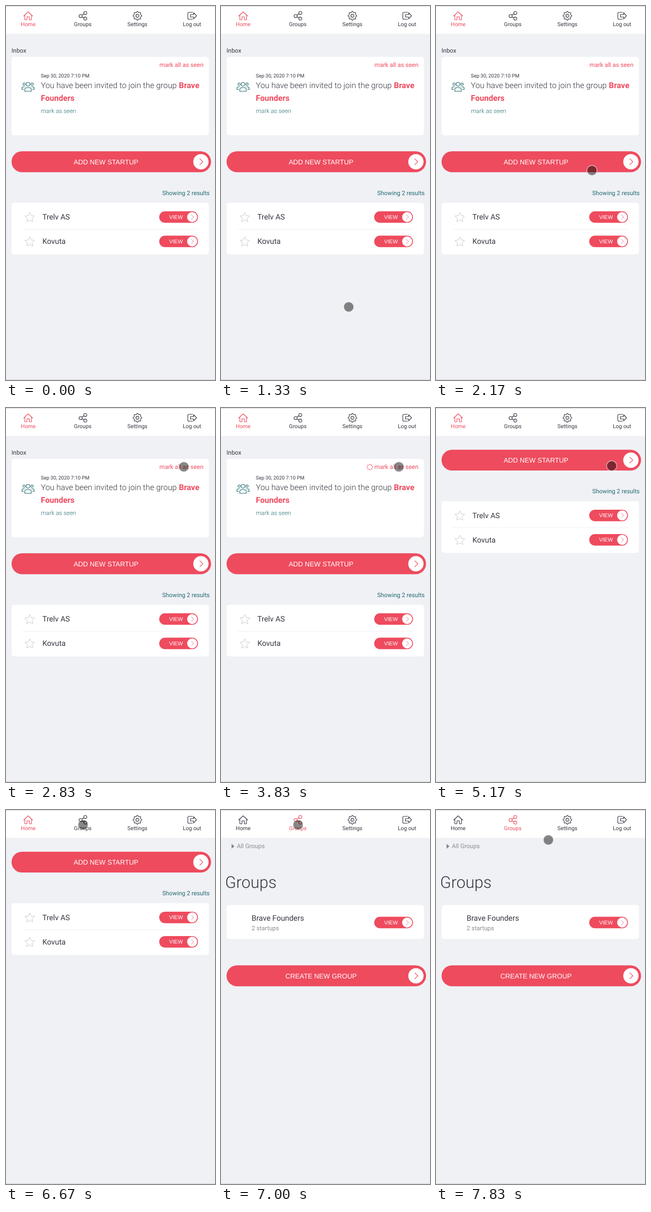
Write an HTML page that moves like this. It is 396 by 706 pixels and loops after 8000 ms.

```html
<!DOCTYPE html>
<html lang="en">
<head>
<meta charset="utf-8">
<title>Startup inbox</title>
<style>
  html, body { margin: 0; height: 100%; overflow: hidden; background: #f0f1f5; }
  svg { display: block; width: 396px; height: 706px; font-family: Roboto, sans-serif; }
  text { fill: currentColor; text-rendering: geometricPrecision; }
  .mid { text-anchor: middle; }
  .end { text-anchor: end; }
  .caps { font-family: "Liberation Sans", Arial, sans-serif; fill: #fff; text-anchor: middle; }
  .icon { fill: none; stroke: currentColor; stroke-width: 1.1; stroke-linejoin: round; stroke-linecap: round; }
  .red { color: #ee4b5e; }
  .teal { color: #236b72; }
  .grey { color: #8b8b92; }
  .dark { color: #363642; }
</style>
</head>
<body>
<svg id="stage" viewBox="0 0 396 706"></svg>
<script>
const text = (x, y, size, str, cls = 'dark', weight = 400) =>
  `<text x="${x}" y="${y}" font-size="${size}" class="${cls}" font-weight="${weight}">${str}</text>`;
const icon = (d, cls = '') => `<path class="icon ${cls}" d="${d}"/>`;
const ring = (x, y, r) => `M${x - r} ${y}a${r} ${r} 0 1 0 ${2 * r} 0a${r} ${r} 0 1 0 ${-2 * r} 0`;
const card = (y, h) => `<rect x="10.5" y="${y}" width="374" height="${h}" rx="5" fill="#fff"/>`;

// Closed outline whose radius depends on the point index
const polar = (cx, cy, n, radius, turn = 0) => 'M' + Array.from({ length: n }, (_, i) => {
  const a = i / n * 2 * Math.PI - Math.PI / 2 + turn;
  return (cx + radius(i) * Math.cos(a)).toFixed(2) + ' ' + (cy + radius(i) * Math.sin(a)).toFixed(2);
}).join('L') + 'Z';

const pill = (x, y, w, h, label, size, labelX, knobX, knobR, tip) => `
  <rect x="${x}" y="${y - h / 2}" width="${w}" height="${h}" rx="${h / 2}" fill="#ee4b5e"/>
  ${text(labelX, y + size * 0.36, size, label, 'caps')}
  <circle cx="${knobX}" cy="${y}" r="${knobR}" fill="#fff"/>
  <path class="icon red" stroke-width="1" d="M${knobX - tip / 2 + 0.8} ${y - tip}l${tip} ${tip}l${-tip} ${tip}"
    style="stroke-width:${tip / 5}"/>`;
const wideButton = (y, label) => pill(10.5, y, 378, 39.4, label, 12.8, 189.5, 369.3, 14.5, 5.6);
const viewButton = y => pill(290.3, y, 73.4, 21.8, 'VIEW', 10.24, 322, 352.7, 9.5, 4);

const row = (y, name) => `
  <path d="${polar(45, y + 1, 10, i => i % 2 ? 4.6 : 9.7)}" fill="none" stroke="#cdcdd3" stroke-linejoin="round"/>
  ${text(69, y + 4.8, 14.3, name)}${viewButton(y)}`;

const navItems = [
  ['Home', 42, 'M33.5 19L42 11L50.5 19M35.7 17.2V26H39.7V20.5H44.3V26H48.3V17.2'],
  ['Groups', 145.5, ring(141.4, 19, 3) + ring(150.3, 13.2, 2.9) + ring(150.3, 23.8, 2.9) +
    'M143.9 17.3L147.8 14.8M144 20.5L147.7 22.5'],
  ['Settings', 249, ring(249, 18.5, 2.9) +
    polar(249, 18.5, 32, i => (i + 1) % 4 < 2 ? 8.2 : 6.5, Math.PI / 32)],
  ['Log out', 352.5, 'M353.5 12H346.5Q344.5 12 344.5 14V23Q344.5 25 346.5 25H353.5' +
    'M349.5 16.2H355.5V12.6L361 18.5L355.5 24.4V20.8H349.5Z']
];
const nav = navItems.map(([label, x, d]) =>
  `<g class="nav">${icon(d)}${text(x, 37.5, 10.4, label, 'mid')}</g>`).join('');

const people = icon(ring(41.8, 147.7, 3.5) + ring(34.3, 147.5, 2.2) + ring(49.3, 147.5, 2.2) +
  'M35.6 161V158.5Q35.6 154 40 154H43.6Q48 154 48 158.5V161Z' +
  'M35 152.5H33Q30.3 152.5 30.3 155.3V157.5H33M48.6 152.5H50.6Q53.3 152.5 53.3 155.3V157.5H50.6', 'teal');

document.getElementById('stage').innerHTML = `
  <rect width="396" height="706" fill="#f0f1f5"/>
  <rect y="52" width="396" height="1" fill="#f6f7f9"/>
  <rect width="396" height="52" fill="#fff"/>
  ${nav}
  <g id="inbox">
    ${text(10.5, 87.5, 11.4, 'Inbox')}
    ${card(96, 148)}
    <circle id="spinner" cx="282" cy="111.5" r="4.9" fill="none" stroke="#ee4b5e" stroke-width="1.7"
      stroke-dasharray="1.85 2"/>
    ${text(374, 115, 11.5, 'mark all as seen', 'red end')}
    ${text(66, 135, 9.5, 'Sep 30, 2020 7:10 PM')}
    ${people}
    ${text(66, 155.2, 15.3, 'You have been invited to join the group', 'dark', 300)}
    ${text(327.5, 155.2, 15.2, 'Brave', 'red', 700)}
    ${text(66, 178.5, 15.2, 'Founders', 'red', 700)}
    ${text(66, 202, 11.4, 'mark as seen', 'teal', 300)}
  </g>
  <g id="home">
    ${wideButton(294, 'ADD NEW STARTUP')}
    ${text(386, 356.7, 11.4, 'Showing 2 results', 'teal end')}
    ${card(371.5, 97.5)}
    <rect x="31" y="421" width="333" height="1" fill="#f1f1f4"/>
    ${row(398.4, 'Trelv AS')}
    ${row(444.4, 'Kovuta')}
  </g>
  <g id="groups">
    <path d="M20 64L25.5 68.5L20 73Z" fill="#85858c"/>
    ${text(30, 72.2, 11.5, 'All Groups', 'grey')}
    ${text(7.8, 146.5, 30.6, 'Groups', 'dark', 300)}
    ${card(179.5, 64)}
    ${text(58, 209, 14.4, 'Brave Founders')}
    ${text(58, 227.3, 11.5, '2 startups', 'grey')}
    ${viewButton(212.4)}
    ${wideButton(313, 'CREATE NEW GROUP')}
  </g>
  <circle id="pointer" r="9.6" fill="rgba(0,0,0,.47)" stroke="rgba(255,255,255,.55)" stroke-width="1.5"/>
  <rect width="396" height="1" fill="#d3d3d5"/>
  <rect y="705" width="396" height="1" fill="#d3d3d5"/>`;

const [inbox, spinner, home, groups, pointer] =
  ['inbox', 'spinner', 'home', 'groups', 'pointer'].map(id => document.getElementById(id));
const navNodes = document.querySelectorAll('.nav');
const show = (node, on) => node.setAttribute('visibility', on ? 'visible' : 'hidden');

const LOOP = 8000, TICK = 1000 / 6, MOVE = 1100;
const stops = [[242, 568], [337, 111], [146, 28], [341, 111]];
const departures = [1570, 5070, 7400];

function pointerAt(t) {
  let [x, y] = stops[0];
  departures.forEach((start, i) => {
    const u = Math.min(1, Math.max(0, (t - start) / MOVE));
    const k = u * u * (3 - 2 * u);
    x += (stops[i + 1][0] - stops[i][0]) * k;
    y += (stops[i + 1][1] - stops[i][1]) * k;
  });
  return [x, y];
}

function draw(now) {
  const t = Math.floor((now % LOOP + 4) / TICK) * TICK;
  const cleared = t > 3950, onGroups = t > 6950;

  show(inbox, !cleared);
  spinner.setAttribute('opacity', t > 2950 ? 1 : 0);
  spinner.setAttribute('transform', `rotate(${t * 0.36} 282 111.5)`);
  show(home, !onGroups);
  home.setAttribute('transform', `translate(0 ${cleared ? -195.6 : 0})`);
  show(groups, onGroups);
  navNodes.forEach((node, i) =>
    node.setAttribute('class', 'nav ' + (i === +onGroups ? 'red' : 'dark')));

  pointer.setAttribute('transform', `translate(${pointerAt(t)})`);
  pointer.setAttribute('opacity', Math.min(1, Math.max(0, (t - 830) / 500)));
}

const begin = performance.now();
function loop() {
  draw(performance.now() - begin);
  requestAnimationFrame(loop);
}
loop();
</script>
</body>
</html>
```
